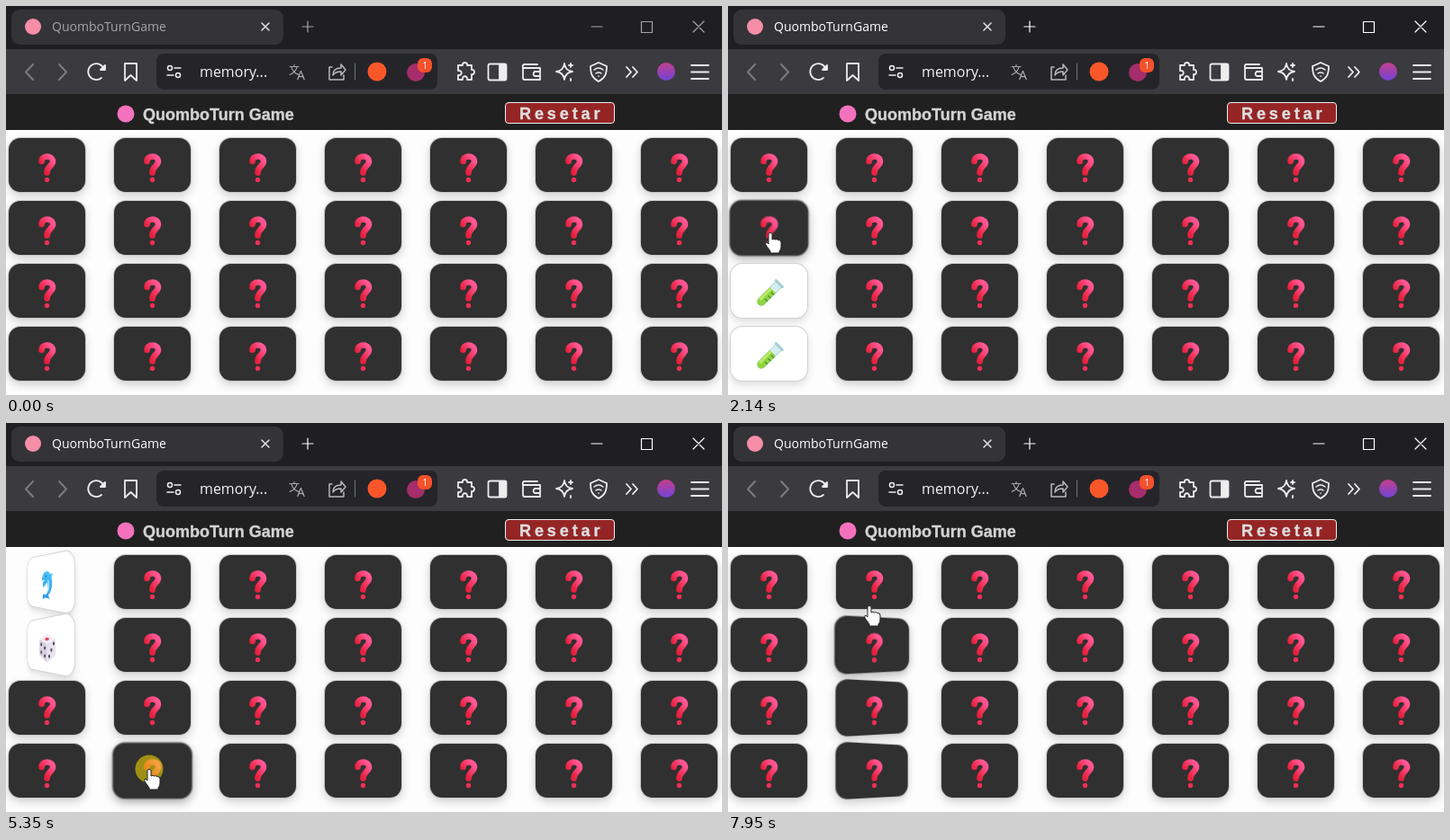
Write an HTML page that moves like this. It is 795 px wide and 433 px high and loops after 8 s.

```html
<!DOCTYPE html>
<html lang="pt">
<head>
<meta charset="utf-8">
<title>Card game</title>
<style>
html, body { margin: 0; width: 100%; height: 100%; overflow: hidden; background: #fdfdfd; }
#stage { position: relative; width: 795px; height: 433px; overflow: hidden; background: #fdfdfd; }
#stage > svg { position: absolute; left: 0; top: 0; }
.ui { font-family: "Open Sans", "Noto Sans", sans-serif; }
.heavy { font: bold 18px "Liberation Sans", Arial, sans-serif; stroke-width: .35px; }
.card { position: absolute; width: 85px; height: 60px; transform-style: preserve-3d; }
.face {
  position: absolute; inset: 0; border-radius: 13px; backface-visibility: hidden;
  background: #303030; box-shadow: 0 0 0 1px #c9c9c9, 0 4px 11px rgba(0,0,0,.2);
}
.face svg { position: absolute; left: 25px; top: 16px; }
.back { background: #fff; box-shadow: 0 0 0 1px #d2d2d2, 0 4px 10px rgba(0,0,0,.15); transform: rotateY(180deg); }
</style>
</head>
<body>
<div id="stage">
<svg id="chrome" width="795" height="433" fill="none" stroke-linecap="round" stroke-linejoin="round">
  <defs>
    <linearGradient id="pink" x1="1" y1="0" x2="0" y2="1">
      <stop offset=".1" stop-color="#ff5794"/><stop offset=".75" stop-color="#e8203d"/>
    </linearGradient>
    <linearGradient id="ball" x1="0" y1="0" x2="0" y2="1">
      <stop stop-color="#c43f8d"/><stop offset="1" stop-color="#7144d6"/>
    </linearGradient>
    <linearGradient id="leaf" x1="0" y1="1" x2="1" y2="0">
      <stop stop-color="#5fe98b"/><stop offset="1" stop-color="#e0b64e"/>
    </linearGradient>
    <linearGradient id="sea" x1="0" y1="0" x2="0" y2="1">
      <stop stop-color="#4cc4f8"/><stop offset="1" stop-color="#2796e6"/>
    </linearGradient>
  </defs>
  <path fill="#1f1e23" d="M0 0H795V48H0z"/>
  <path fill="#3b3a3f" d="M0 48H795V98H0z"/>
  <path fill="#202020" d="M0 98H795V138H0z"/>
  <rect x="6" y="4" width="302" height="39" rx="9" fill="#343338"/>
  <rect x="167" y="53" width="312" height="40" rx="8" fill="#252429"/>
  <circle cx="30" cy="23" r="9" fill="#f58ea6"/>
  <path stroke="#e6e6e6" stroke-width="1.5" d="M284 19l8 8m0-8l-8 8"/>
  <g id="focus" class="ui">
    <text x="51" y="28" font-size="14" fill="currentColor">QuomboTurnGame</text>
    <path stroke="currentColor" stroke-width="1.2" d="M329 23h12m-6-6v12M650 23h12M705.5 17.5h12v12h-12zM763 17l12 12m0-12l-12 12"/>
  </g>

  <g stroke="#7c7b81" stroke-width="2"><path d="M30 65l-8 8.500 8 8.500M59 65l8 8.500-8 8.500"/></g>
  <g stroke="#ededee" stroke-width="1.8">
    <path d="M106 80a9 9 0 1 1 3-9"/><path fill="#ededee" d="M105 71h5v-5z"/>
    <path d="M132 64h13v19l-6.500-6-6.500 6z"/>
    <g stroke-width="1.5">
      <circle cx="182" cy="69" r="2.500"/><path d="M187 69h7M179 77h7"/><circle cx="191" cy="77" r="2.500"/>
      <path stroke="#b9b9bd" d="M362 68h-3v14h16v-5M363 77c0-6 4-8 9-8v-4l5 6-5 6v-4c-4 0-7 1-9 4z"/>
      <path stroke="#77767c" stroke-width="1" d="M387.500 64v18"/>
    </g>
    <path d="M502 66h5c-1-4 6-4 5 0h5v5c4-1 4 6 0 5v6h-5c1-5-6-5-5 0h-5v-5c5 1 5-6 0-5z"/>
    <rect x="535.500" y="64.500" width="20" height="18" rx="2"/><path fill="#ededee" d="M548 65h7v17h-7z"/>
    <path d="M590 65h-14q-3 0-2 4v11q0 2 2 2h17v-13h-18M593 73h-6q-3 3 0 5h6"/>
    <path d="M620 64q1 8 9 9-8 1-9 9-1-8-9-9 8-1 9-9zM627 64v4m-2-2h4M627 81v2"/>
    <path d="M658 63l9 4c0 9-2 13-9 17-7-4-9-8-9-17z"/><path stroke-width="1.500" d="M653 71q5-4 10 0M655 75q3-2 6 0M658 78v.2"/>
    <path d="M689 68l5 5.500-5 5.500m7-11l5 5.500-5 5.500M761 66h19M761 73.500h19M761 81h19"/>
  </g>
  <g class="ui" fill="#b9b9bd">
    <text x="215" y="79" font-size="16" fill="#f3f3f3">memory...</text>
    <text x="314" y="76" font-size="12" font-family="Noto Sans CJK JP, Noto Sans CJK SC, sans-serif">文</text>
    <text x="323" y="82" font-size="14">A</text>
  </g>
  <circle cx="412" cy="73" r="10.500" fill="#f9572a"/>
  <circle cx="455" cy="74" r="10" fill="#a52d6b"/>
  <rect x="457" y="58" width="16" height="16" rx="6" fill="#f4512c"/>
  <text class="ui" x="462.500" y="70" font-size="10" fill="#fff">1</text>
  <circle cx="733" cy="73" r="10" fill="url(#ball)"/>

  <circle cx="133" cy="120" r="9.500" fill="#f472bd"/>
  <text class="heavy" x="152" y="127" fill="#d3d3d3" stroke="#d3d3d3">QuomboTurn Game</text>
  <rect x="554.500" y="107.500" width="121" height="23" rx="3.500" fill="#952525" stroke="#eee"/>
  <text class="heavy" x="570" y="126" fill="#dedede" stroke="#dedede" letter-spacing="3.900">Resetar</text>
</svg>
<div id="board"></div>
<svg id="pointer" width="795" height="433">
  <circle id="press" r="15.500" fill="#eed500" opacity=".58"/>
  <path id="hand" fill="#fff" stroke="#222" stroke-width="1" stroke-linejoin="round"
    d="M-2 1.500Q0-1 2 1.500V8q2-1.500 3.500 0 2-1 3.500 .7 3-.7 3 2.300V16q0 3-2 5v2H0v-2L-5 14q-1-3 1-3l2 2z"/>
</svg>
</div>
<script>
const LOOP = 8000, TURN = 800;
const $ = id => document.getElementById(id);
const icon = body => `<svg width="35" height="35" viewBox="-17.5 -17.5 35 35" fill="none" stroke-linecap="round" stroke-linejoin="round">${body}</svg>`;
const dot = (x, y, rx = 1.6, ry = 2, fill = '#51455f') => `<ellipse cx="${x}" cy="${y}" rx="${rx}" ry="${ry}" fill="${fill}"/>`;

const question = icon(`<path stroke="url(#pink)" stroke-width="6.600" d="M-6-7.500C-6-15 6.500-14.500 6.500-7.500 6.500-2.500-.2-2 0 5"/>
  <circle cy="13" r="2.700" fill="#ef2f55"/>`);

const art = {
  tube: icon(`<g transform="rotate(45)"><path fill="#d7eef0" stroke="#b1d6d4" d="M-4.500-16h9V12a4.500 4.500 0 0 1-9 0z"/>
    <path fill="#93d43f" d="M-4.500-6h9V12a4.500 4.500 0 0 1-9 0z"/><path fill="#b8eb67" d="M-4-6h3V12h-3z"/>
    <path stroke="#468d3d" stroke-width="1.400" d="M1-3h3M1 2h3M1 7h3"/><path stroke="#a4cdd5" stroke-width="3" d="M-5-16H5"/></g>`),
  dice: icon(`<path fill="#f2edf6" d="M0-16l15 6v18L0 16l-15-8v-18z"/><path fill="#d8cfe0" d="M-15-10L0-4v20l-15-8z"/>
    <path fill="#e9e2ef" d="M0-4l15-6V8L0 16z"/>` + dot(0, -10, 3.6, 1.7, '#e64560') +
    [[-11, -4], [-4, 0], [-11, 5], [-4, 9], [4, 9], [8, 2], [12, -5]].map(p => dot(...p)).join('')),
  dolphin: icon(`<path fill="url(#sea)" d="M-6-14Q2-18 6-12l5-1-3 4Q12 4 2 11l3 4-7-1-7 2 2-6 5 1Q5 4 0-3l-7 6-1-6 4-3-6 1q0-4 4-9z"/>
    <path stroke="#b9e9ff" stroke-width="2" d="M2-5q4 7-2 13"/><circle cx="-2" cy="-10" r="1" fill="#154b7d"/>`),
  access: icon(`<rect x="-16" y="-16" width="32" height="32" rx="3" fill="#3d95ef"/><circle cx="-1" cy="-9.500" r="2.500" fill="#fff"/>
    <path stroke="#fff" stroke-width="2.500" d="M-1-5V3H6l3 7M-1-2h6M-5 1a6.500 6.500 0 1 0 9 8"/>`),
  puzzle: icon(`<path fill="url(#leaf)" transform="rotate(-22)" d="M-11-9h7c-4-8 9-8 5 0h9v8c8-4 8 9 0 5v8H2c4-7-9-7-5 0h-8V4c-7 4-7-9 0-5z"/>`)
};

// row, column, art, time turned up, time turned down
const turns = [
  [3, 0, 'tube', 860, 2796],
  [2, 0, 'tube', 1315, 2796],
  [1, 0, 'dice', 3160, 5190],
  [0, 0, 'dolphin', 3660, 5190],
  [3, 1, 'puzzle', 5430, 7470],
  [2, 1, 'access', 6004, 7470],
  [1, 1, 'tube', 7865, 9999]
];

// time, x, y of the fingertip
const path = [
  [200, 105, 436], [620, 54, 394], [960, 53, 390], [1240, 58, 325], [1400, 59, 323],
  [1640, 148, 328], [1800, 160, 258], [1940, 130, 258], [2140, 47, 252], [3180, 47, 252],
  [3560, 56, 190], [3720, 57, 189], [4070, 134, 195], [4470, 155, 390], [4720, 160, 195],
  [4940, 159, 385], [5450, 159, 385], [5880, 163, 324], [6040, 164, 322], [6280, 174, 248],
  [7540, 174, 248], [7840, 170, 240], [7950, 157, 203], [8000, 156, 200]
];

const clamp = v => Math.min(1, Math.max(0, v));

// cubic-bezier(.25, .1, .25, 1)
function ease(x) {
  if (x <= 0 || x >= 1) return clamp(x);
  let lo = 0, hi = 1, u;
  for (let i = 0; i < 18; i++) {
    u = (lo + hi) / 2;
    const at = .75 * u * (1 - u) + u ** 3;
    if (at < x) lo = u; else hi = u;
  }
  return .3 * u * (1 - u) ** 2 + 3 * u * u * (1 - u) + u ** 3;
}

function tipAt(t) {
  const i = path.findIndex(p => p[0] > t);
  if (i < 1) return [-99, -99];
  const [t0, x0, y0] = path[i - 1], [t1, x1, y1] = path[i];
  const k = (t - t0) / (t1 - t0), s = k * k * (3 - 2 * k);
  return [x0 + (x1 - x0) * s, y0 + (y1 - y0) * s];
}

const cards = [];
for (let row = 0; row < 4; row++) {
  for (let col = 0; col < 7; col++) {
    const turn = turns.find(c => c[0] === row && c[1] === col);
    const x = 3 + 117 * col, y = 147 + 70 * row;
    const el = document.createElement('div');
    el.className = 'card';
    el.style.left = x + 'px';
    el.style.top = y + 'px';
    el.innerHTML = `<div class="face">${question}</div>` + (turn ? `<div class="face back">${art[turn[2]]}</div>` : '');
    $('board').append(el);
    if (col < 2) cards.push({ el, x, y, turn });
  }
}

// Share of the last 140 ms spent over the card gives a soft hover.
function hoverOf(card, t) {
  let n = 0;
  for (let i = 0; i < 8; i++) {
    const [x, y] = tipAt(t - i * 20);
    if (x > card.x && x < card.x + 85 && y > card.y && y < card.y + 55) n++;
  }
  return n / 8;
}

function draw(t) {
  for (const card of cards) {
    const hover = hoverOf(card, t);
    let angle = 0;
    if (card.turn) {
      const [, , , up, down] = card.turn;
      angle = 180 * (ease((t - up) / TURN) - ease((t - down) / TURN));
    }
    card.el.style.transform = angle || hover
      ? `perspective(202px) scale(${1 + .03 * hover}) rotateY(${angle}deg)` : 'none';
    card.el.firstChild.style.boxShadow = hover
      ? `0 0 0 1px rgb(${201 - 60 * hover},${201 - 60 * hover},${201 - 60 * hover}), 0 4px 11px rgba(0,0,0,${.2 + .15 * hover})` : '';
  }
  const [x, y] = tipAt(t);
  $('hand').setAttribute('transform', `translate(${x} ${y})`);
  $('press').setAttribute('transform', `translate(${x} ${y})`);
  const pressed = turns.some(c => t > c[3] - 90 && t < c[3]);
  $('press').style.display = pressed ? '' : 'none';
  $('focus').style.color = t < 770 ? '#a5a4a8' : '#fff';
}

const start = performance.now();
function tick() {
  draw((performance.now() - start) % LOOP);
  requestAnimationFrame(tick);
}
tick();
</script>
</body>
</html>
```
